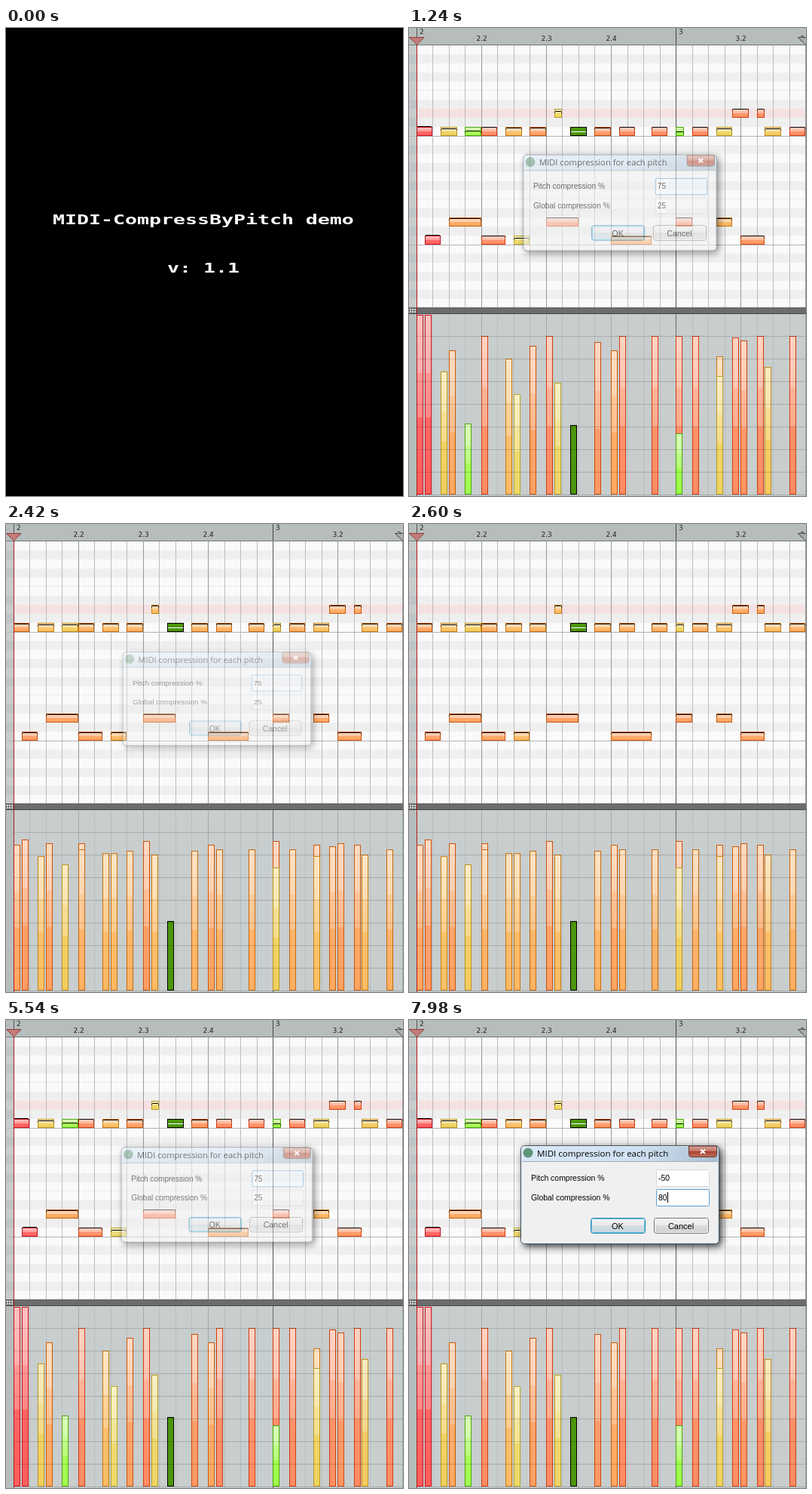
Write an HTML page that moves like this. It is 527 px wide and 620 px high and loops after 8 s.

```html
<!DOCTYPE html>
<html lang="en">
<head>
<meta charset="utf-8">
<title>Pitch compression demo</title>
<style>
  html, body { margin: 0; width: 100%; height: 100%; overflow: hidden; background: #000; }
  svg { display: block; width: 527px; height: 620px; }
  .title { font: bold 18px "DejaVu Sans Mono", monospace; fill: #fff; white-space: pre; }
  .ruler { font: 9px "DejaVu Sans", sans-serif; fill: #222; }
  .caption { font: 11.55px "Open Sans", "Noto Sans", sans-serif; fill: #000; }
  .label { font: 10.45px "Liberation Sans", Arial, sans-serif; fill: #000; }
  .button { font: 11px "Liberation Sans", Arial, sans-serif; fill: #000; text-anchor: middle; }
</style>
</head>
<body>
<svg id="stage" viewBox="0 0 527 620" xmlns="http://www.w3.org/2000/svg"></svg>
<script>
const LOOP = 8000, WIDTH = 527, LEFT = 10, STEP = 10.756;
const ROLL_TOP = 22, ROLL_BOTTOM = 370, LANE_TOP = 379, LANE_BOTTOM = 618;
const ROW = 12, SELECTED = 19;
const ROWS = { D4: 107, C4: 131, D3: 251, C3: 275 };

// pitch, start step, length in steps, bar top before, bar top after
const NOTES = [
  ['C4', 0, 2, 380, 425], ['C3', 1, 2, 380, 418], ['C4', 3, 2, 455, 440],
  ['D3', 4, 4, 427, 423], ['C4', 6, 2, 524, 451], ['C4', 8, 2, 408, 431],
  ['C3', 8, 3, 408, 423], ['C4', 11, 2, 438, 436], ['C3', 12, 2, 485, 436],
  ['C4', 14, 2, 421, 433], ['D3', 16, 4, 408, 420], ['D4', 17, 1, 470, 438],
  ['C4', 19, 2, 526, 526], ['C4', 22, 2, 416, 433], ['C3', 24, 5, 427, 425],
  ['C4', 25, 2, 408, 431], ['C4', 29, 2, 408, 431], ['D3', 32, 2, 408, 420],
  ['C4', 32, 1, 537, 455], ['C4', 34, 2, 408, 431], ['D3', 37, 2, 435, 425],
  ['C4', 37, 2, 461, 440], ['D4', 39, 2, 410, 427], ['C3', 40, 3, 414, 423],
  ['D4', 42, 1, 408, 425], ['C4', 43, 2, 449, 438], ['C4', 46, 2, 408, 431]
];

// velocity, fill, border
const PALETTE = [
  [0.34, [155, 255, 70], [70, 165, 10]],
  [0.42, [165, 255, 80], [80, 170, 20]],
  [0.55, [238, 217, 108], [180, 170, 40]],
  [0.68, [240, 209, 92], [184, 150, 36]],
  [0.74, [252, 194, 100], [198, 130, 20]],
  [0.80, [255, 168, 98], [200, 92, 8]],
  [0.88, [255, 140, 100], [208, 60, 16]],
  [1.00, [255, 92, 92], [200, 16, 32]]
];

const rect = (x, y, w, h, fill, extra = '') =>
  `<rect x="${x}" y="${y}" width="${w}" height="${h}" fill="${fill}" ${extra}/>`;
const line = (x1, y1, x2, y2, color) =>
  `<path d="M${x1} ${y1}L${x2} ${y2}" stroke="${color}" fill="none"/>`;
const text = (x, y, cls, value, extra = '') =>
  `<text x="${x}" y="${y}" class="${cls}" ${extra}>${value}</text>`;
const gradient = (id, stops, direction = 'x2="0" y2="1"') =>
  `<linearGradient id="${id}" ${direction}>` + stops.map(([offset, color, opacity = 1]) =>
    `<stop offset="${offset}" stop-color="${color}" stop-opacity="${opacity}"/>`).join('') +
  '</linearGradient>';

const velocity = top => (LANE_BOTTOM - top) / (LANE_BOTTOM - LANE_TOP);
const stepX = step => Math.floor(LEFT + STEP * step + 0.35);

function velocityColors(v) {
  let i = 1;
  while (i < PALETTE.length - 1 && PALETTE[i][0] < v) i++;
  const [a, b] = [PALETTE[i - 1], PALETTE[i]];
  const k = Math.max(0, Math.min(1, (v - a[0]) / (b[0] - a[0])));
  return [1, 2].map(c => `rgb(${a[c].map((n, j) => Math.round(n + (b[c][j] - n) * k))})`);
}

function background() {
  let out = rect(0, 0, WIDTH, 620, '#b7bdbd') +
    rect(0, ROLL_TOP, LEFT, ROLL_BOTTOM - ROLL_TOP, '#c8cccc') +
    rect(LEFT, ROLL_TOP, WIDTH, ROLL_BOTTOM - ROLL_TOP, '#fafafa');
  const blackKeys = [1, 3, 6, 8, 10];
  for (let i = -10; i < 20; i++) {
    const y = 131 + i * ROW, key = ((-i % 12) + 12) % 12;
    const top = Math.max(y, ROLL_TOP), h = Math.min(y + ROW, ROLL_BOTTOM) - top;
    if (h <= 0) continue;
    if (blackKeys.includes(key)) {
      out += rect(LEFT, top, WIDTH, h, '#efefef') + rect(0, top, LEFT, h, '#bec3c3');
    }
    if (key === 4) out += line(LEFT, y - 0.5, WIDTH, y - 0.5, '#ececec');
  }
  out += rect(LEFT, ROWS.D4, WIDTH, ROW, '#f5e1e1');
  for (const y of [143.5, 287.5]) out += line(0, y, WIDTH, y, '#b4b4b4');
  out += rect(LEFT, LANE_TOP, WIDTH, 241, '#c8cdcd');
  for (let i = 1; i <= 24; i++) {
    const x = stepX(2 * i) + 0.5, beat = i % 4 === 0, bar = i === 16;
    out += line(x, ROLL_TOP, x, ROLL_BOTTOM, bar ? '#555' : beat ? '#989898' : '#bcbcbc');
    out += line(x, LANE_TOP, x, 620, bar ? '#666c6c' : beat ? '#a4a9a9' : '#b8bdbd');
  }
  out += line(0, 22.5, WIDTH, 22.5, '#747a7a') + line(354.5, 0, 354.5, 22, '#444') +
    line(10.5, 0, 10.5, 12, '#555');
  out += text(14, 8, 'ruler', '2') + text(358, 8, 'ruler', '3') + text(519, 17, 'ruler', '3.3');
  ['2.2', '2.3', '2.4'].forEach((label, i) => out += text(89.5 + 86 * i, 17, 'ruler', label));
  out += text(433.5, 17, 'ruler', '3.2');
  out += '<path d="M.5 12.5H20L10.5 22Z" fill="#c47d7a" stroke="#8c3c38"/>' +
    '<path d="M516.5 12.5H536L526.5 22Z" fill="#aab0b0" stroke="#444"/>';
  out += rect(0, 370, WIDTH, 8, '#6c6c6c') + rect(0, 378, WIDTH, 1, '#484848');
  for (let i = 0; i < 6; i++) out += rect(1 + i % 3 * 3, 372 + (i > 2 ? 3 : 0), 2, 2, '#dedede');
  return out;
}

function laneLines() {
  let out = '';
  for (let y = 408.5; y < 620; y += 30) out += line(LEFT, y, WIDTH, y, 'rgba(0,0,0,.16)');
  return out;
}

function noteShape([pitch, start, length, top]) {
  const x = stepX(start), w = stepX(start + length) - x, y = ROWS[pitch];
  const v = velocity(top);
  if (start === SELECTED) {
    return rect(x + 0.5, y + 0.5, w - 1, 11, '#4b9708', 'stroke="#000"') +
      line(x + 1, y + 6.5, x + w - 1, y + 6.5, '#fff');
  }
  const [fill, border] = velocityColors(v);
  const lineY = y + Math.round((1 - v) * 10) - 0.5;
  return rect(x + 0.5, y + 0.5, w - 1, 11, fill, `stroke="${border}"`) +
    rect(x + 1, y + 1, w - 2, 10, 'url(#noteShade)') +
    `<path d="M${x + 0.5} ${lineY + 2}V${lineY + 1}L${x + 1.5} ${lineY}H${x + w - 1.5}` +
    `L${x + w - 0.5} ${lineY + 1}V${lineY + 2}" fill="none" stroke="#000"/>`;
}

function barShape([, start, , top]) {
  const x = stepX(start), h = LANE_BOTTOM - top;
  if (start === SELECTED) return rect(x + 0.5, top + 0.5, 8, h - 1, '#4b9708', 'stroke="#000"');
  const [fill, border] = velocityColors(velocity(top));
  return rect(x + 0.5, top + 0.5, 8, h - 1, fill, `stroke="${border}"`) +
    rect(x + 1, top + 1, 7, h - 2, 'url(#barShade)');
}

function scene(id, topIndex) {
  const notes = NOTES.map(n => [n[0], n[1], n[2], n[topIndex]]);
  const bars = [...notes].sort((a, b) => a[3] - b[3]);
  return `<g id="${id}">${background()}${notes.map(noteShape).join('')}` +
    `${bars.map(barShape).join('')}${laneLines()}${line(10.5, 22, 10.5, 620, '#b01c1c')}</g>`;
}

function field(id, y) {
  return rect(328.5, y + 0.5, 70, 22, '#fff', `id="${id}Box" rx="1"`) +
    rect(330, y + 4, 13, 17, '#fff') +
    text(331, y + 15, 'label', '', `id="${id}Text"`) +
    rect(0, y + 4, 1, 14, '#000', `id="${id}Caret"`);
}

function dialog() {
  return '<g id="dialog"><g filter="url(#shadow)">' +
    rect(148.5, 166.5, 263, 130, 'url(#glass)', 'rx="5" stroke="#4a545e"') + '</g>' +
    rect(149.5, 167.5, 261, 128, 'none', 'rx="4" stroke="#e4f0fa" stroke-opacity=".75"') +
    rect(150, 187, 260, 108, '#f0f0f0') + line(150, 187.5, 410, 187.5, '#a0acb8') +
    '<circle cx="158" cy="176" r="6.5" fill="#5f9478"/>' +
    text(170, 181, 'caption', 'MIDI compression for each pitch') +
    '<path d="M371.5 167V178Q371.5 181.5 375 181.5H405Q408.5 181.5 408.5 178V167Z" fill="url(#closeFill)" stroke="#6a3a36"/>' +
    '<path d="M387 171.5L393 177M393 171.5L387 177" stroke="#fff" stroke-width="2"/>' +
    text(162, 213, 'label', 'Pitch compression %') +
    text(162, 239, 'label', 'Global compression %') +
    field('pitch', 198) + field('global', 224) +
    rect(241.5, 262.5, 72, 20, 'url(#buttonFill)', 'rx="3" stroke="#2f80a8"') +
    rect(243, 273, 69, 8, '#b9e2f4', 'id="pulse"') +
    rect(242.5, 263.5, 70, 18, 'none', 'rx="2" stroke="#5cc8f0"') +
    text(277, 277, 'button', 'OK') +
    rect(325.5, 262.5, 72, 20, 'url(#buttonFill)', 'rx="3" stroke="#707070"') +
    rect(326.5, 263.5, 70, 18, 'none', 'rx="2" stroke="#fafafa"') +
    text(361, 277, 'button', 'Cancel') + '</g>';
}

const stage = document.getElementById('stage');
stage.innerHTML = '<defs>' +
  gradient('barShade', [[0, '#fff', .62], [.32, '#fff', .5], [.32, '#fff', .36],
    [.57, '#fff', .26], [.57, '#fff', .05], [1, '#fff', 0]]) +
  gradient('noteShade', [[0, '#fff', .6], [.5, '#fff', .36], [.51, '#fff', .08], [1, '#fff', 0]]) +
  gradient('glass', [[0, '#d9e8f8'], [.6, '#cfe0f2'], [1, '#a9bfd0']], 'x2="1" y2="0"') +
  gradient('closeFill', [[0, '#d8a298'], [.48, '#c27262'], [.5, '#a8402e'], [1, '#c0705c']]) +
  gradient('buttonFill', [[0, '#f3f3f3'], [.49, '#ebebeb'], [.5, '#dcdcdc'], [1, '#cfcfcf']]) +
  '<filter id="shadow" x="-10%" y="-15%" width="120%" height="135%">' +
  '<feDropShadow dx="3" dy="3" stdDeviation="5" flood-color="#000" flood-opacity=".8"/></filter></defs>' +
  scene('before', 3) + scene('after', 4) + dialog() +
  '<g id="intro">' + rect(0, 0, WIDTH, 620, '#000') +
  text(0, 0, 'title', 'MIDI-CompressByPitch demo', 'transform="translate(62 260) scale(1.4765 1)"') +
  text(0, 0, 'title', 'v: 1.1', 'transform="translate(214 324) scale(1.4765 1)"') + '</g>';

const el = id => document.getElementById(id);
const show = (id, on) => el(id).setAttribute('display', on ? 'inline' : 'none');
const latest = (list, t) => list.reduce((found, item) => item[0] <= t ? item : found);

// start, opacity, scale
const DIALOG = [[0, 0, 1], [1240, .55, .975], [1420, 1, 1], [2420, .35, .95], [2600, 0, 1],
  [5540, .5, .965], [5720, 1, 1]];
// start, pitch value, global value, focused field, caret shown
const TYPING = [[0, '75', '25', 'pitch', false], [5900, '7', '25', 'pitch', true],
  [6090, '', '25', 'pitch', true], [6270, '-', '25', 'pitch', true],
  [6950, '-50', '25', 'pitch', true], [7310, '-50', '25', 'global', true],
  [7810, '-50', '8', 'global', true], [7980, '-50', '80', 'global', true]];
const PULSE = [[0, .3], [5900, .4], [6090, .5], [6270, .35], [6770, .3], [6950, .45],
  [7130, .5], [7310, .35], [7810, .45], [7980, .35]];

function updateField(id, value, focused, caret, repainted) {
  const label = el(id + 'Text');
  label.textContent = value;
  el(id + 'Box').setAttribute('stroke', focused ? '#5c9fd4' : '#d5d8de');
  el(id + 'Box').setAttribute('fill', repainted ? '#fff' : id === 'pitch' ? '#f0f5fa' : '#f1f1f4');
  show(id + 'Caret', focused && caret);
  el(id + 'Caret').setAttribute('x', Math.round(331 + (value ? label.getComputedTextLength() : 0)));
}

function render(t) {
  show('intro', t < 500);
  show('after', t >= 2420 && t < 4600);
  const [, opacity, scale] = latest(DIALOG, t);
  show('dialog', opacity > 0);
  if (opacity > 0) {
    el('dialog').setAttribute('opacity', opacity);
    el('dialog').setAttribute('transform',
      scale === 1 ? '' : `translate(281 233) scale(${scale}) translate(-281 -233)`);
    const [, pitch, global, focus, caret] = latest(TYPING, t);
    updateField('pitch', pitch, focus === 'pitch', caret, t >= 7310);
    updateField('global', global, focus === 'global', caret, t >= 7310);
    el('pulse').setAttribute('opacity', latest(PULSE, t)[1]);
  }
}

function tick() {
  render(performance.now() % LOOP);
  requestAnimationFrame(tick);
}
tick();
</script>
</body>
</html>
```
